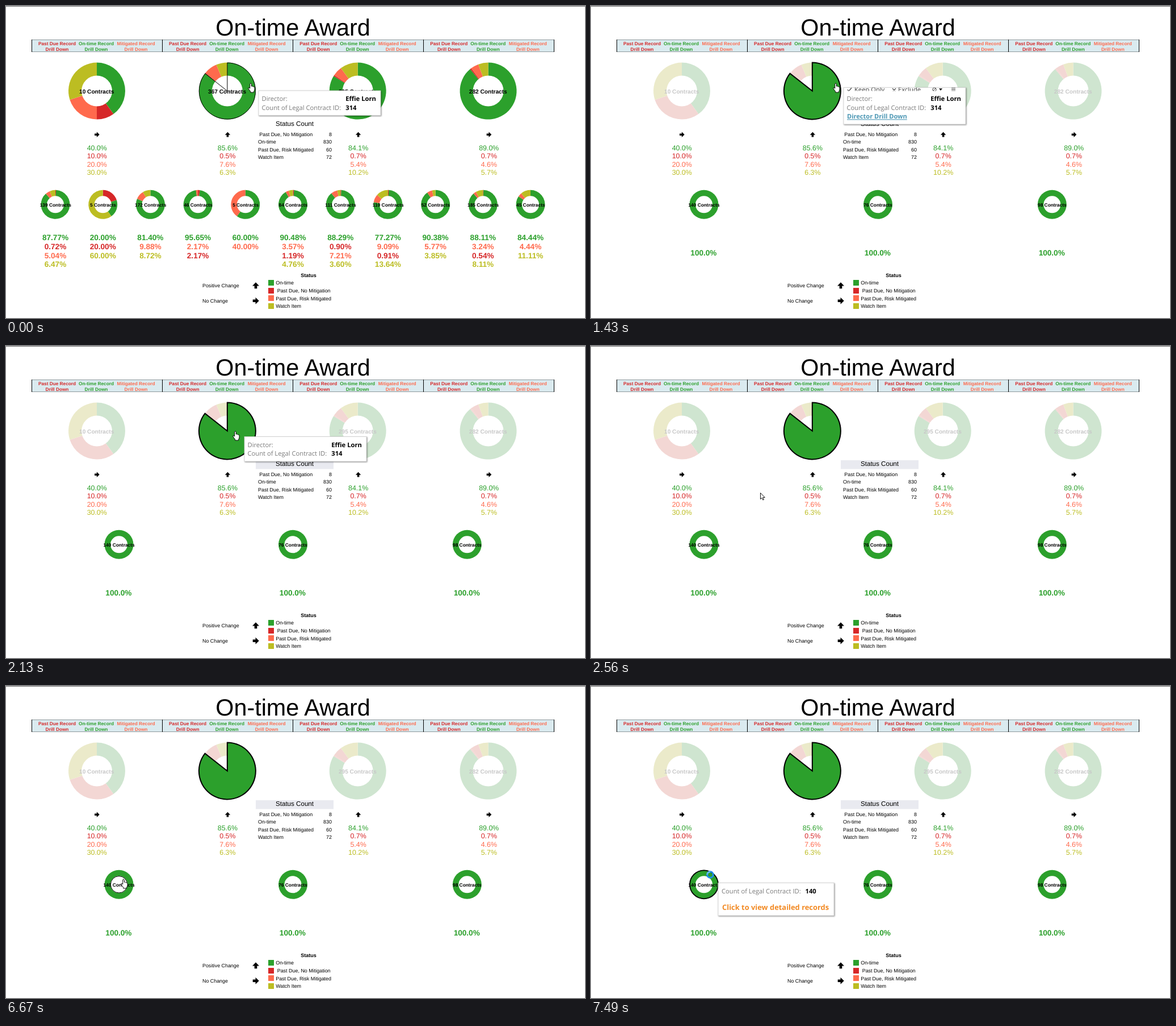
An HTML page that plays this animation: 1020 by 549 pixels, repeating every 8000 ms.

```html
<!DOCTYPE html>
<html lang="en">
<head>
<meta charset="utf-8">
<title>On-time Award</title>
<style>
  html, body { margin: 0; width: 100%; height: 100%; overflow: hidden; background: #fff; }
  svg { display: block; width: 100%; height: 100%; }
  text { font-family: "Liberation Sans", Arial, sans-serif; text-rendering: geometricPrecision; }
  .tip text { font-family: "Open Sans", "Noto Sans", sans-serif; }
  .tip { filter: drop-shadow(1px 1px 1.2px rgba(0, 0, 0, .45)); }
  .b { font-weight: 700; }
  .m { text-anchor: middle; }
  .e { text-anchor: end; }
  .u { text-decoration: underline; }
</style>
</head>
<body>
<svg id="stage" viewBox="0 0 1020 549"></svg>
<script>
const BRIGHT = { g: '#2ca02c', r: '#d62728', o: '#ff6a4d', y: '#bcbd22', label: '#000' };
const DIM = { g: '#cfe5d0', r: '#f3d7d4', o: '#f3d7d4', y: '#ebeaca', label: '#c8c8c8' };
const ORDER = ['g', 'r', 'o', 'y'];

const text = (x, y, size, str, cls = '', fill = '#000') =>
  `<text x="${x}" y="${y}" font-size="${size}" class="${cls}" fill="${fill}">${str}</text>`;
const rect = (x, y, w, h, fill) =>
  `<rect x="${x}" y="${y}" width="${w}" height="${h}" fill="${fill}"/>`;
const circle = (x, y, r, attrs) => `<circle cx="${x}" cy="${y}" r="${r}" ${attrs}/>`;
const group = (id, body, attrs = '') => `<g id="${id}" ${attrs}>${body}</g>`;

function wedge(cx, cy, r, from, to) {
  const at = f => {
    const a = f * 2 * Math.PI;
    return `${(cx + r * Math.sin(a)).toFixed(2)} ${(cy - r * Math.cos(a)).toFixed(2)}`;
  };
  return `M${cx} ${cy}L${at(from)}A${r} ${r} 0 ${to - from > .5 ? 1 : 0} 1 ${at(to)}Z`;
}

// parts: list of [colour key, share]
function donut(cx, cy, r, hole, parts, colors) {
  const total = parts.reduce((s, p) => s + p[1], 0);
  let from = 0, out = '';
  for (const [key, share] of parts) {
    const to = from + share / total;
    out += parts.length === 1
      ? circle(cx, cy, r, `fill="${colors[key]}"`)
      : `<path d="${wedge(cx, cy, r, from, to)}" fill="${colors[key]}"/>`;
    from = to;
  }
  return out + circle(cx, cy, hole, 'fill="#fff"');
}

const arrow = (x, y, scale, turn) =>
  `<path d="M0-5 5.2.4H2V4.6H-2V.4H-5.2Z" transform="translate(${x} ${y}) rotate(${turn}) scale(${scale})"/>`;

// Header
const headings = [['Past Due', BRIGHT.r, 90], ['On-time', BRIGHT.g, 159], ['Mitigated', BRIGHT.o, 229]];
function header() {
  let out = rect(0, 0, 1020, 1, '#6a6a6a') + text(505.5, 52, 41.3, 'On-time Award', 'm');
  out += rect(45, 59, 921, 22, '#daeaef') + rect(45, 59, 921, 1, '#8e999d') + rect(45, 80, 921, 1, '#8e999d');
  for (let i = 0; i < 5; i++) out += rect(45 + i * 230, 59, 1, 22, '#000');
  for (let i = 0; i < 4; i++) {
    for (const [name, color, x] of headings) {
      const cx = x + i * 230.1;
      out += text(cx, 69, 8.25, name + ' Record', 'b m', color) + text(cx, 78.7, 8.25, 'Drill Down', 'b m', color);
    }
  }
  return out;
}

// Directors: contracts, arrow turn, shares in ORDER
const directors = [
  [10, 90, [40, 10, 20, 30]],
  [367, 0, [85.6, .5, 7.6, 6.3]],
  [295, 0, [84.1, .7, 5.4, 10.2]],
  [282, 90, [89, .7, 4.6, 5.7]]
];
const PIE_Y = 149.5;
const pieX = i => 160 + i * 229.85;
const sharpSlice = (r, attrs) => `<path d="${wedge(pieX(1), PIE_Y, r, 0, .856)}" stroke="#000" ${attrs}/>`;
const directorPies = colors => directors.map(([n, , shares], i) =>
  donut(pieX(i), PIE_Y, 50, 27, shares.map((s, k) => [ORDER[k], s]), colors) +
  (i === 1 && colors === BRIGHT ? sharpSlice(49.6, 'fill="none"') : '') +
  text(pieX(i) - .3, 153.6, 10.15, n + ' Contracts', 'b m', colors.label)).join('');
const directorShares = () => directors.map(([, turn, shares], i) => {
  const x = 160.2 + i * 230.2;
  return arrow(x, 226.3, .9, turn) +
    shares.map((s, k) => text(x, 254 + k * 14.4, 12.4, s.toFixed(1) + '%', 'm', BRIGHT[ORDER[k]])).join('');
}).join('');

// Teams: contracts, then shares in reading order
const teams = [
  [139, 'g87.77 r0.72 o5.04 y6.47'], [5, 'g20.00 r20.00 y60.00'], [172, 'g81.40 o9.88 y8.72'],
  [46, 'g95.65 o2.17 r2.17'], [5, 'g60.00 o40.00'], [84, 'g90.48 o3.57 r1.19 y4.76'],
  [111, 'g88.29 r0.90 o7.21 y3.60'], [110, 'g77.27 o9.09 r0.91 y13.64'], [52, 'g90.38 o5.77 y3.85'],
  [185, 'g88.11 o3.24 r0.54 y8.11'], [45, 'g84.44 o4.44 y11.11']
];
const TEAM_Y = 349.3;
const teamLabel = (x, n) => text(x, 352.8, 8.35, n + ' Contracts', 'b m');
function allTeams() {
  return teams.map(([n, list], i) => {
    const x = 87 + i * 83.7;
    const rows = list.split(' ').map(s => [s[0], s.slice(1)]);
    const parts = rows.map(([k, v]) => [k, +v]).sort((a, b) => 'rgoy'.indexOf(a[0]) - 'rgoy'.indexOf(b[0]));
    return donut(x, TEAM_Y, 25.5, 15, parts, BRIGHT) + teamLabel(x + .3, n) +
      rows.map(([k, v], j) => text(x, 412.3 + j * 15.6, 13.6, v + '%', 'b m', BRIGHT[k])).join('');
  }).join('');
}
function pickedTeams() {
  const ring = (r, w) => circle(199, TEAM_Y, r, `fill="none" stroke="#000" stroke-width="${w}"`);
  return [[199, 140], [505.5, 76], [812.3, 98]].map(([x, n], i) =>
    donut(x, TEAM_Y, 25.5, 15, [['g', 100]], BRIGHT) +
    (i ? '' : group('inner', ring(14.7, 1)) + group('outer', ring(25, 1)) + group('thick', ring(25, 1.8))) +
    teamLabel(x, n) + text(x - .6, 438.7, 13.6, '100.0%', 'b m', BRIGHT.g)).join('');
}

// Counts and legend
const statuses = [['Past Due, No Mitigation', 8], ['On-time', 830], ['Past Due, Risk Mitigated', 60], ['Watch Item', 72]];
const statusCount = () =>
  group('band', rect(440, 201, 137, 15.5, '#e9eaf0')) + text(508.5, 211.2, 11.6, 'Status Count', 'm') +
  statuses.map(([name, n], i) => {
    const y = 228.5 + i * 13.6;
    return text(i ? 444 : 446.3, y, 8.95, name) + text(574, y, 8.95, n, 'e');
  }).join('');
const legend = () => text(533, 477.3, 9, 'Status', 'b m') +
  [['On-time', 'g'], ['Past Due, No Mitigation', 'r'], ['Past Due, Risk Mitigated', 'o'], ['Watch Item', 'y']]
    .map(([name, k], i) => rect(462, Math.round(482 + i * 13.7), 10, 10, BRIGHT[k]) +
      text(k === 'r' ? 477.7 : 475.2, 490.2 + i * 13.7, 8.95, name)).join('') +
  text(346, 495, 8.9, 'Positive Change') + arrow(440, 492, 1.15, 0) +
  text(346, 522.3, 8.9, 'No Change') + arrow(440, 518.8, 1.15, 90);

// Tooltips
const GREY = '#7b7b7b';
const panel = (id, w, h) => `<rect id="${id}" width="${w}" height="${h}" fill="#fff" stroke="#cfcfcf" stroke-width=".8"/>`;
const field = (x, y, name, value, valueX) => text(x, y, 11.2, name, '', GREY) + text(valueX, y, 11.2, value, 'b');
const tools = () => group('tools',
  text(19, 0, 11.2, 'Keep Only', '', '#444') + text(96, 0, 11.2, 'Exclude', '', '#444') +
  '<path d="M7-4l2 3 5-6M86-6l6 6m0-6l-6 6" fill="none" stroke="#444" stroke-width="1.2"/>' +
  circle(160, -4, 3.2, 'fill="none" stroke="#444"') +
  '<path d="M158-2l4-4M190-7h7M190-4.5h7M190-2h7M190 .5h7" stroke="#444"/><path d="M168-6h6l-3 4z" fill="#222"/>');
const directorTip = () => group('director',
  panel('directorBox', 215, 43.5) +
  '<clipPath id="slot"><rect id="slotBox" width="215"/></clipPath>' +
  group('toolbar', tools(), 'clip-path="url(#slot)"') +
  field(5.5, 18, 'Director:', 'Effie Lorn', 153.3) +
  field(5.5, 33.7, 'Count of Legal Contract ID:', '314', 153.3) +
  group('link', text(6, 49.3, 11.05, 'Director Drill Down', 'b u', '#4c97b4')),
  'class="tip"');
const teamTip = () => group('team',
  panel('teamBox', 204, 57.5) + field(6, 18.5, 'Count of Legal Contract ID:', '140', 153.5) +
  text(7, 47.5, 12.9, 'Click to view detailed records', 'b', '#f28a24'),
  'class="tip"');

const cursors = () =>
  group('arrow', '<path d="M.5.5V11.5L3.1 9.2 4.8 13 6.5 12.3 4.9 8.5H8.3Z" fill="#fff" stroke="#000" stroke-width=".9"/>') +
  group('hand', '<path d="M-1.3 9V1Q0-1.2 1.3 1V5.2Q2.8 4.3 3.4 5.7 4.8 4.9 5.4 6.4 7 5.9 7 7.7V11Q6.7 13 5.6 14.3V16H-.4V14.3Q-2.4 12-4 9.2-4.6 7.3-2.8 7.7Z" fill="#fff" stroke="#000" stroke-width=".95"/>') +
  group('ring', circle(0, 0, 5.3, 'fill="none" stroke="#1e8fe8" stroke-width="3"') +
    '<path d="M-5.3 0A5.3 5.3 0 0 1 0-5.3" fill="none" stroke="#5cb8f5" stroke-width="3"/>');

document.getElementById('stage').innerHTML =
  rect(0, 0, 1020, 549, '#fff') + header() +
  group('bright', directorPies(BRIGHT)) + group('dim', directorPies(DIM)) +
  group('slice', sharpSlice(50, `fill="${BRIGHT.g}" stroke-width="2"`)) +
  directorShares() + statusCount() + group('all', allTeams()) + group('few', pickedTeams()) + legend() +
  directorTip() + teamTip() + cursors();

// Each cue changes only what it names; the state at a time is all cues up to it.
const LOOP = 8000;
const cues = [
  { t: 0, cursor: 'hand', at: [431, 136], director: [445, 149], team: null, bar: 0, picked: false, filtered: false, band: false, outline: '' },
  { t: 600, picked: true },
  { t: 1150, cursor: 'ring', at: [431, 135] },
  { t: 1430, cursor: 'hand', at: [431, 136], filtered: true, bar: 1 },
  { t: 1580, bar: 2 },
  { t: 2130, at: [404, 150], director: [420, 159.5], bar: 0, band: true },
  { t: 2260, at: [367, 175], director: [394, 180.5] },
  { t: 2410, cursor: 'arrow', at: [340, 191], director: null },
  { t: 2560, at: [298, 258] },
  { t: 6000, at: [254, 295] },
  { t: 6150, at: [238, 310] },
  { t: 6270, at: [222, 325] },
  { t: 6390, at: [211, 334] },
  { t: 6540, cursor: 'hand', at: [210, 337], team: [224, 350.5], outline: 'outer' },
  { t: 6670, at: [207, 340], team: null, outline: 'inner' },
  { t: 6940, at: [210, 336], outline: 'outer' },
  { t: 7060, team: [224.5, 350] },
  { t: 7210, at: [210, 332], team: [224, 346.5] },
  { t: 7490, cursor: 'ring', outline: 'thick' }
];

const el = id => document.getElementById(id);
const show = (id, on) => { el(id).style.display = on ? '' : 'none'; };
const place = (id, pos) => {
  show(id, pos);
  if (pos) el(id).setAttribute('transform', `translate(${pos})`);
};
const span = (id, y, h) => {
  el(id).setAttribute('y', y);
  el(id).setAttribute('height', h);
};

function draw(time) {
  const s = Object.assign({}, ...cues.filter(c => c.t <= time));
  for (const id of ['bright', 'all']) show(id, !s.filtered);
  for (const id of ['dim', 'few']) show(id, s.filtered);
  for (const id of ['inner', 'outer', 'thick']) show(id, s.outline === id);
  for (const id of ['arrow', 'hand', 'ring']) place(id, s.cursor === id ? s.at : null);
  show('slice', s.picked);
  show('band', s.band);
  place('director', s.director);
  place('team', s.team);

  // The toolbar slides up out of the tooltip's top edge.
  const lift = [0, 5.5, 25][s.bar];
  span('directorBox', -lift, (s.bar ? 59 : 43.5) + lift);
  span('slotBox', -lift, lift + .5);
  place('tools', s.bar ? [0, s.bar === 1 ? 2 : -8] : null);
  show('link', s.bar);
}

function tick() {
  draw(performance.now() % LOOP);
  requestAnimationFrame(tick);
}
tick();
</script>
</body>
</html>
```
